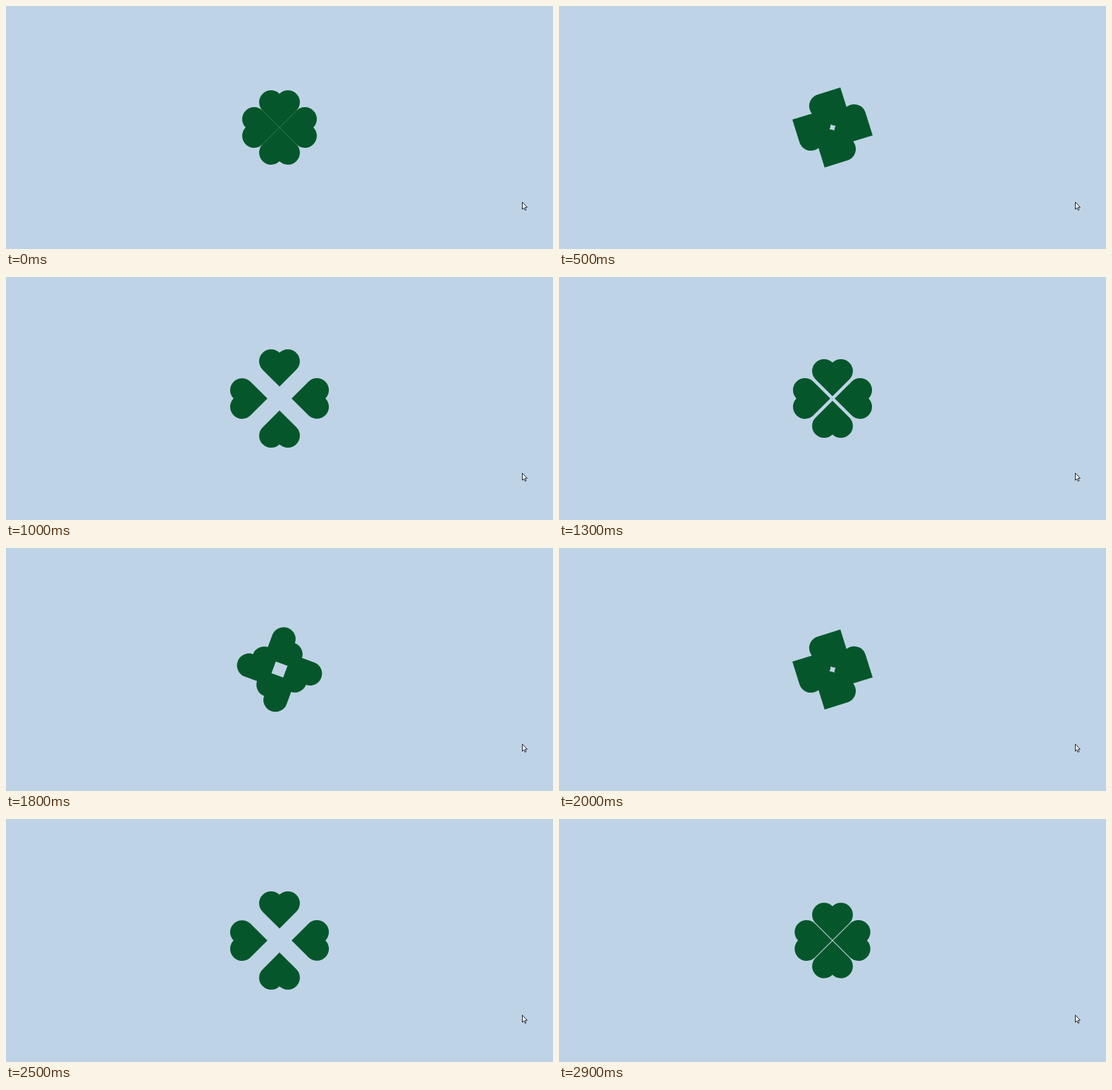
These frames come from a looping animation (776x346 px, 3000 ms). An HTML page:

```html
<!DOCTYPE html>
<html lang="en">
<head>
<meta charset="utf-8">
<title>Clover</title>
<style>
  html, body { margin: 0; width: 100%; height: 100%; overflow: hidden; background: #bfd3e6; }
  svg { display: block; width: 776px; height: 346px; }
  .leaf { fill: #05572b; }
</style>
</head>
<body>
<svg viewBox="0 0 776 346">
  <defs>
    <path id="heart" d="M0 24.04L-24.04 0A17 17 0 0 1 0 -24.04A17 17 0 0 1 24.04 0Z"/>
  </defs>
  <g id="clover" transform="translate(388 173)"></g>
  <path transform="translate(732.5 279.2)" fill="#fff" stroke="#1c2430" stroke-width="1" stroke-linejoin="round"
    d="M0 0V10.2L2.3 8.1L3.8 11.6L5.4 10.9L3.9 7.5H6.9Z"/>
</svg>
<script>
  const CYCLE = 1500, STEP = 100, RADIUS = 24.04, REACH = 22;
  const clover = document.getElementById('clover');

  const leaves = [0, 90, 180, 270].map(angle => {
    const use = document.createElementNS('http://www.w3.org/2000/svg', 'use');
    use.setAttribute('href', '#heart');
    use.setAttribute('class', 'leaf');
    clover.append(use);
    return { use, angle };
  });

  const span = (t, from, to) => Math.min(1, Math.max(0, (t - from) / (to - from)));
  const outQuad = u => 1 - (1 - u) ** 2;
  const inOutQuad = u => u < 0.5 ? 2 * u * u : 1 - 2 * (1 - u) ** 2;

  // Leaves fly out while spinning once, then glide back together.
  function draw(time) {
    const t = Math.floor(time / STEP) * STEP % CYCLE;
    const spin = 360 * outQuad(span(t, 225, 1012));
    const shift = REACH * (t < 750 ? span(t, 213, 757) : 1 - inOutQuad(span(t, 750, 1500)));
    for (const { use, angle } of leaves) {
      use.setAttribute('transform',
        `rotate(${angle}) translate(0 ${-RADIUS - shift}) rotate(${spin})`);
    }
  }

  const start = performance.now();
  function tick() {
    draw(performance.now() - start);
    requestAnimationFrame(tick);
  }
  tick();
</script>
</body>
</html>
```
